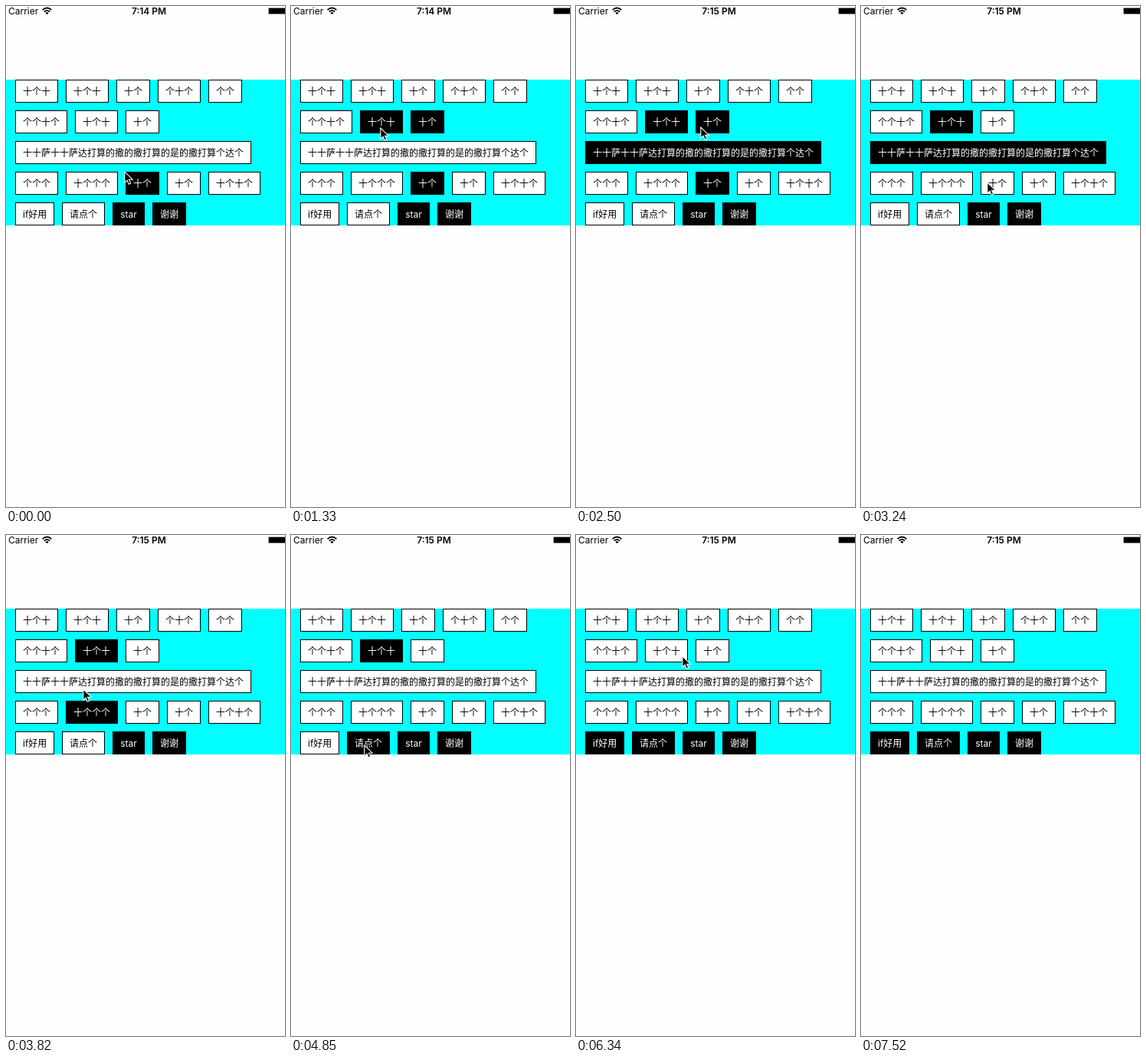
Animation, 364 px wide and 653 px high, one loop 7810 ms. Source, as an HTML page:

```html
<!DOCTYPE html>
<html lang="zh-CN">
<head>
<meta charset="utf-8">
<style>
  html, body { margin: 0; width: 100%; height: 100%; overflow: hidden; background: #fefefe; }
  #stage { position: relative; width: 364px; height: 653px; overflow: hidden; color: #000;
    font: 12px Inter, "Noto Sans CJK SC", "Noto Sans CJK", sans-serif; }
  #stage > * { position: absolute; }
  .status { top: 0; line-height: 13px; white-space: nowrap; }
  #clock { left: 136px; width: 101px; text-align: center; font-weight: 600; }
  #panel { top: 96px; width: 364px; height: 190px; background: #0ff; }
  .row { display: flex; gap: 10px; margin: 0 0 10px 12px; }
  .tag { box-sizing: border-box; flex: none; height: 30px; padding: 0 9px; border: 1px solid #000;
    background: #fff; line-height: 30px; text-align: center; white-space: nowrap; }
  .tag.on { background: #000; color: #fff; }
  svg { left: 0; top: 0; }
</style>
</head>
<body>
<div id="stage">
  <div class="status" style="left:3px">Carrier</div>
  <div class="status" id="clock">7:14 PM</div>
  <div id="panel"></div>
  <svg width="364" height="653">
    <path d="M47.6 5.2Q53.5 -.2 59.4 5.2M49.8 7.5Q53.5 4.2 57.2 7.5"
      fill="none" stroke="#000" stroke-width="1.8"/>
    <path d="M51.4 8.9Q53.5 7.2 55.6 8.9L53.5 11Z"/>
    <rect x="342.5" y="2.5" width="24" height="8" rx="1" fill="#000" stroke="#999"/>
    <path id="cursor" d="M.8 1V15.2L4.1 12.1L6.2 17.2L8.7 16.1L6.5 11.2H11.2Z"
      stroke="#fff" stroke-width="1.1"/>
  </svg>
</div>
<script>
const LOOP = 7810, TICKS = 53, TICK = LOOP / TICKS;
const CLOCK_TICK = 13;
// A star marks a tag that starts selected.
const rows = [
  '十个十 十个十 十个 个十个 个个',
  '个个十个 十个十 十个',
  '十十萨十十萨达打算的撒的撒打算的是的撒打算个达个',
  '个个个 十个个个 *十个 十个 十个十个',
  'if好用 请点个 *star *谢谢'
];
// The cursor rests at each stop and toggles the tag beneath it.
const stops = [
  { tick: 0, x: 154, y: 215 },
  { tick: 5, x: 162, y: 157 },
  { tick: 9, x: 116, y: 158 },
  { tick: 12, x: 122, y: 188 },
  { tick: 18, x: 162, y: 157 },
  { tick: 21, x: 164, y: 229 },
  { tick: 24, x: 104, y: 227 },
  { tick: 26, x: 100, y: 200 },
  { tick: 29, x: 102, y: 229 },
  { tick: 33, x: 95, y: 273 },
  { tick: 35, x: 40, y: 270 },
  { tick: 38, x: 163, y: 107, idle: true },
  { tick: 43, x: 138, y: 157 },
  { tick: 51, x: 301, y: 640 }
];
const exitTick = stops.at(-1).tick;

const cursor = document.getElementById('cursor');
const clock = document.getElementById('clock');
const panel = document.getElementById('panel');

function addElement(parent, className, text = '') {
  const element = document.createElement('div');
  element.className = className;
  element.textContent = text;
  return parent.appendChild(element);
}

const tags = rows.flatMap(words => {
  const row = addElement(panel, 'row');
  return words.split(' ').map(word => {
    const element = addElement(row, 'tag', word.replace('*', ''));
    element.style.width = element.offsetWidth + 'px';
    return { element, startsOn: word.startsWith('*') };
  });
});

for (const tag of tags) {
  const box = tag.element.getBoundingClientRect();
  tag.clicks = stops.filter(({ x, y, idle }) =>
    !idle && x > box.left && x < box.right && y > box.top && y < box.bottom);
}

// Each move starts a tick after one stop and ends a tick before the next.
function cursorAt(tick) {
  const next = stops.findIndex(stop => stop.tick > tick);
  if (next < 0) return stops.at(-1);
  const from = stops[next - 1], to = stops[next];
  const span = Math.max(1, to.tick - from.tick - 2);
  const part = Math.min(1, Math.max(0, (tick - from.tick - 1) / span));
  const eased = part * part * (3 - 2 * part);
  const mix = (a, b) => Math.round(a + (b - a) * eased);
  return { x: mix(from.x, to.x), y: mix(from.y, to.y) };
}

function render(now) {
  const tick = Math.floor((now % LOOP + 14) / TICK) % TICKS;
  for (const { element, startsOn, clicks } of tags) {
    const toggles = clicks.filter(click => click.tick <= tick).length;
    element.classList.toggle('on', (toggles % 2 === 1) !== startsOn);
  }
  clock.textContent = tick < CLOCK_TICK ? '7:14 PM' : '7:15 PM';
  const { x, y } = cursorAt(tick);
  cursor.setAttribute('transform', `translate(${x} ${y})`);
  cursor.style.display = tick < exitTick ? '' : 'none';
}

const start = performance.now();
function frame() {
  render(performance.now() - start);
  requestAnimationFrame(frame);
}
frame();
</script>
</body>
</html>
```
